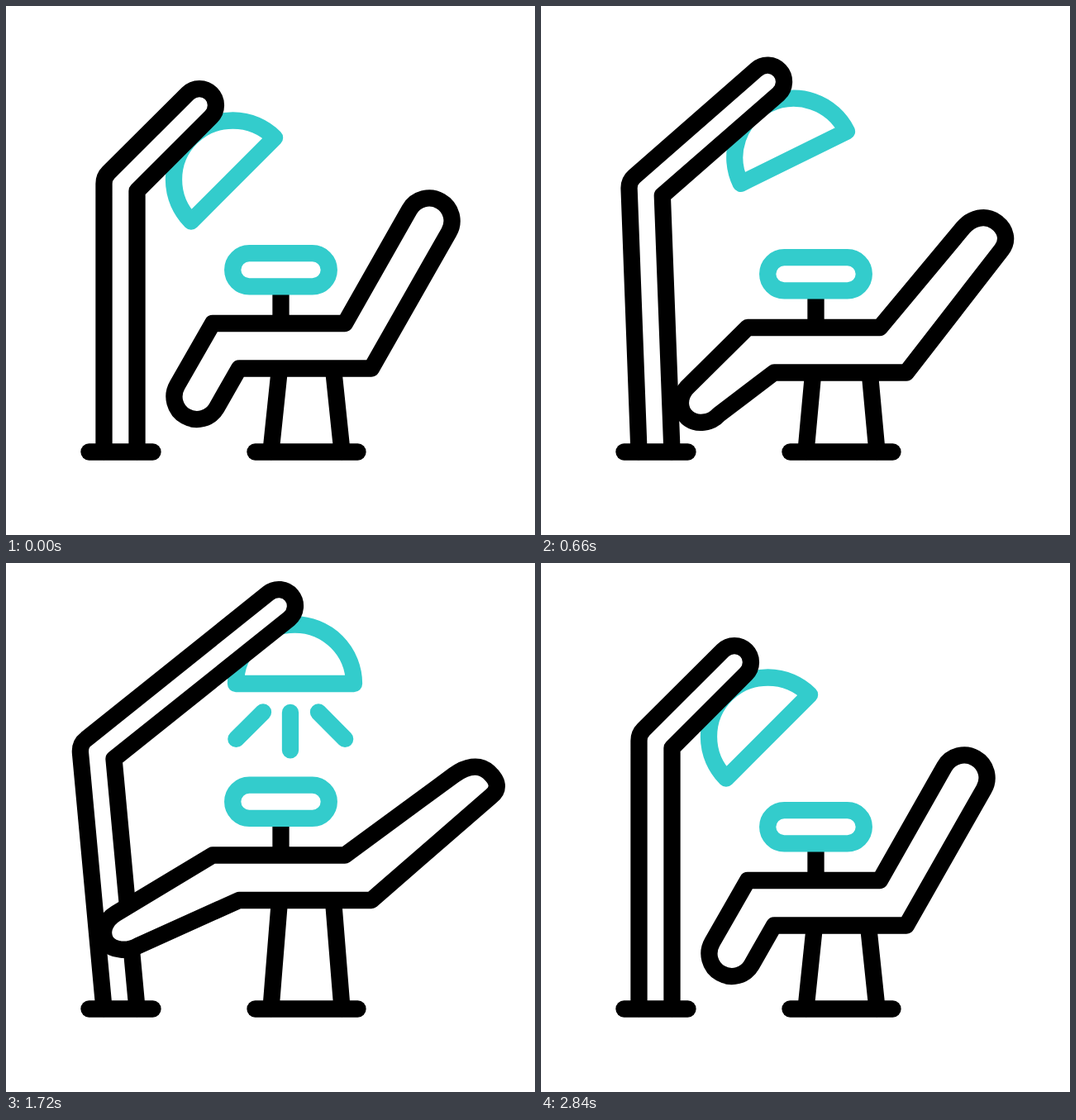
An HTML page for the animation above (3.2 s loop, 640 by 640 pixels).

```html
<!DOCTYPE html>
<html lang="en">
<head>
<meta charset="utf-8">
<title>Treatment chair</title>
<style>
  html, body { margin: 0; height: 100%; overflow: hidden; background: #fff; }
  svg { display: block; width: 100%; height: 100%; }
  path, rect { fill: #fff; stroke: #000; stroke-width: 20.3; stroke-linecap: round; stroke-linejoin: round; }
  .teal { stroke: #3cc; }
</style>
</head>
<body>
<svg viewBox="0 0 640 640">
  <path id="dome" class="teal" d="M-71.5 0A71.5 71.5 0 0 1 71.5 0Z"/>
  <path id="post"/>
  <path d="M100.5 539.5H177.5"/>
  <path id="rays" class="teal"/>
  <path id="legs"/>
  <path d="M301.5 539.5H425.5"/>
  <g id="chair">
    <path d="M332.5 384V335"/>
    <path id="body"/>
    <rect class="teal" x="274.2" y="299.2" width="116.6" height="40.2" rx="20.1"/>
  </g>
</svg>
<script>
const LOOP = 3200, LIFT = 30.5;
const el = id => document.getElementById(id);
const lerp = (a, b, p) => a + (b - a) * p;

// Eased progress from 0 to 1 between two times
const ease = (t, from, to) => {
  const s = Math.min(1, Math.max(0, (t - from) / (to - from)));
  return s * s * (3 - 2 * s);
};

// Blend two paths with the same commands
const NUMBER = /[\d.]+/g;
const morph = ([a, b], p) => {
  const ends = b.match(NUMBER);
  let i = 0;
  return a.replace(NUMBER, n => lerp(+n, +ends[i++], p).toFixed(2));
};

const POST = [
  "M118.5 539L118.5 215Q118.5 207 124 201.5L219.9 105.9C227.7 98.1 240.3 98.1 248.1 105.9C255.9 113.7 255.9 126.3 248.1 134.1L158.5 223.7L158.5 539",
  "M118.5 539L90 230Q89 219 97 213L317.4 36.5C325.9 29.6 338.6 30.9 345.5 39.4C352.4 47.9 351.1 60.6 342.6 67.5L130.5 237L158.5 539"
];
const BODY = [
  "M250 384L410 384L488.2 246.2C495.8 233 512.6 228.6 525.8 236.2C539 243.8 543.4 260.6 535.8 273.8L442 438.5L282 438.5L254.8 486.2C247.2 499.4 230.4 503.9 217.2 496.3C204 488.7 199.6 471.9 207.2 458.7Z",
  "M250 384L410 384L542 287C556 277 572 272.5 584 283.5C596 294.5 597 304.5 587 312.5L442 438.5L282 438.5L160 493.5C148 500.5 129 500.5 121 488.5C114 476.5 120 462.5 133 454.5Z"
];
const RAYS = [[311, 180.5, 276.5, 214.8], [344, 181, 344, 229], [378, 180.5, 412, 214.8]];

function rays(t) {
  const start = ease(t, 2410, 2660);
  let end = ease(t, 945, 1195);
  // Two pulses of the outer ends
  if (t > 1195 && t < 2420) {
    const half = 306.25, k = (t - 1195) % (2 * half);
    end = 1 - 0.28 * (k < half ? ease(k, 0, half) : 1 - ease(k, half, 2 * half));
  }
  if (end <= start) return "";
  return RAYS.map(([x1, y1, x2, y2]) => {
    const at = p => `${lerp(x1, x2, p)} ${lerp(y1, y2, p)}`;
    return `M${at(start)}L${at(end)}`;
  }).join("");
}

function draw(t) {
  const open = t < 1600 ? ease(t, 455, 918) : 1 - ease(t, 2420, 2840);
  const sink = t < 1600 ? ease(t, 0, 360) : 0;
  const y = lerp(LIFT * sink, -LIFT, open);
  const half = 32.5 + 3 * sink * (1 - open);

  el("post").setAttribute("d", morph(POST, open));
  el("dome").setAttribute("transform",
    `translate(${lerp(274.5, 349.5, open)} ${lerp(210, 146, open)}) rotate(${-45 * (1 - open)})`);
  el("body").setAttribute("d", morph(BODY, open));
  el("chair").setAttribute("transform", `translate(0 ${y})`);
  el("legs").setAttribute("d",
    `M320.5 539L${363.5 - half} ${438.5 + y}M406.5 539L${363.5 + half} ${438.5 + y}`);
  el("rays").setAttribute("d", rays(t));
}

const begin = performance.now();
function tick() {
  draw((performance.now() - begin) % LOOP);
  requestAnimationFrame(tick);
}
tick();
</script>
</body>
</html>
```
